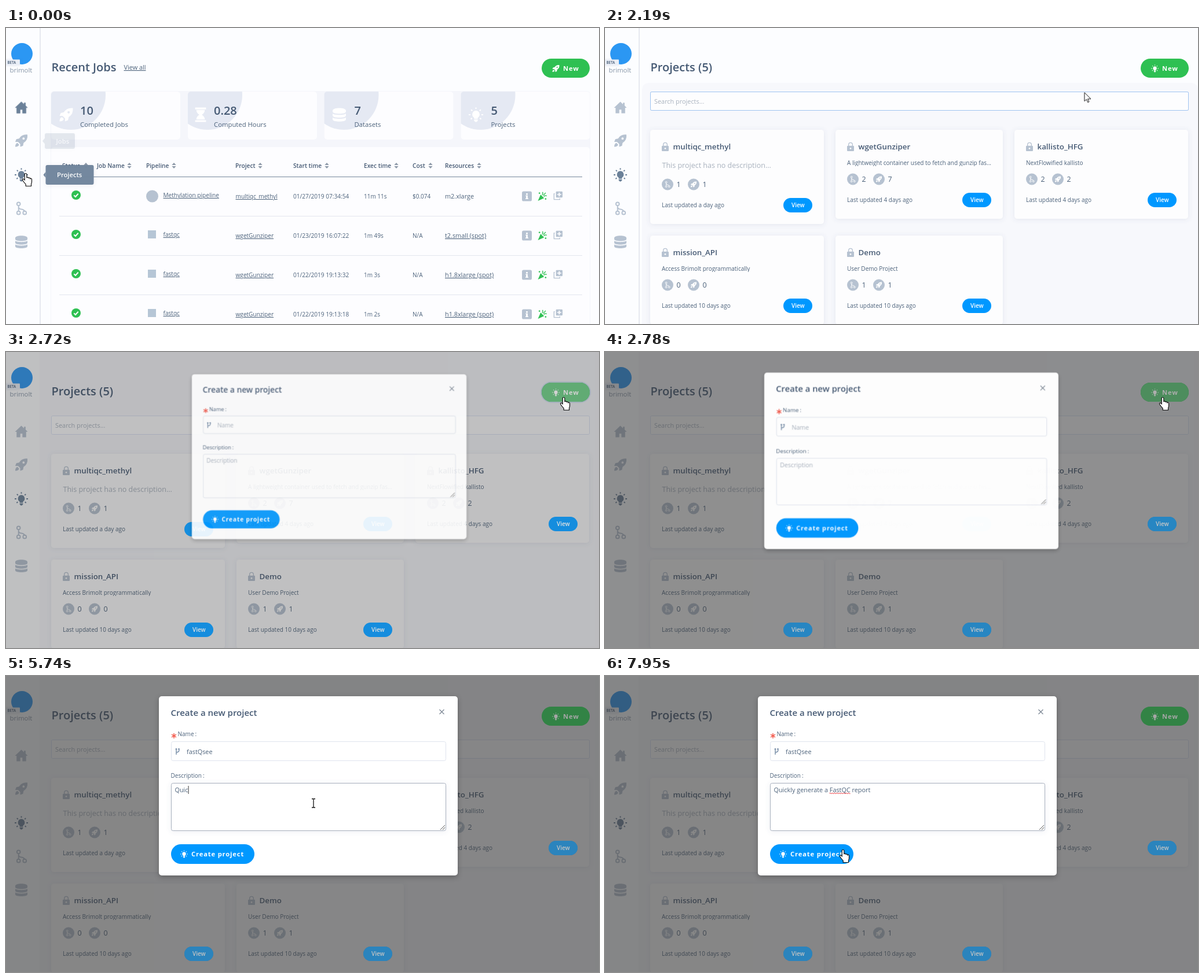
These frames come from a looping animation (1024x512 px, 8 s). An HTML page:

```html
<!DOCTYPE html>
<html lang="en">
<head>
<meta charset="utf-8">
<title>Create a project</title>
<style>
html, body { margin: 0; width: 100%; height: 100%; overflow: hidden; background: #fcfdff; }
svg { display: block; }
#stage { width: 100vw; height: 100vh; font: 10px "Open Sans", sans-serif; }
text { fill: #4c627b; white-space: pre; }
symbol { fill: currentColor; overflow: visible; }
.line { fill: none; stroke: currentColor; stroke-width: 2; }
.semi { font-weight: 600; fill: #465a74; }
.pale { fill: #a9b2be; }
.brand { fill: #8796a8; }
.light { fill: #fff; font-weight: 600; }
.bold { fill: #fff; font-weight: 700; font-size: 11.2px; letter-spacing: .85px; }
.link { text-decoration: underline; }
.field { fill: #fff; stroke: #dfe4ee; }

.anim { animation: 8s linear infinite; }
.step { animation-timing-function: step-end; }

#jobsTip { animation-name: jobsTip; }
@keyframes jobsTip { 0%, .7% { opacity: .18 } 2.1%, 100% { opacity: 0 } }
#projectsTip { animation-name: projectsTip; }
@keyframes projectsTip { 0%, 22.375% { opacity: .98 } 23.875%, 100% { opacity: 0 } }
#jobsPage { animation-name: jobsPage; }
@keyframes jobsPage { 0%, 11.5% { opacity: 1 } 14.5% { opacity: .04 } 15.1%, 100% { opacity: 0 } }
#shade { animation-name: shade; }
@keyframes shade { 0% { opacity: 0 } 31%, 100% { opacity: 1 } }
#searchHover { animation-name: searchHover; }
@keyframes searchHover { 0% { opacity: 0 } 23.5% { opacity: 1 } 27.5%, 100% { opacity: 0 } }
#newHover { animation-name: newHover; }
@keyframes newHover { 0%, 28% { opacity: 0 } 29%, 40.25% { opacity: 1 } 41.75%, 100% { opacity: 0 } }
#newRing { animation-name: newRing; }
@keyframes newRing { 0%, 31% { opacity: 0 } 32%, 33.5% { opacity: 1 } 34.5%, 100% { opacity: 0 } }
#mask { animation-name: mask; }
@keyframes mask { 0%, 33.1% { opacity: 0 } 33.25% { opacity: .08 } 34.75% { opacity: .92 } 35.2%, 100% { opacity: 1 } }
#modal { animation-name: modal; transform-origin: 966px 78px; }
@keyframes modal {
  0% { opacity: 0; transform: scale(.2) }
  33.125% { opacity: 0; transform: scale(.2); animation-timing-function: cubic-bezier(.08, .82, .17, 1) }
  35.75%, 100% { opacity: 1; transform: scale(1) }
}
#nameFocus { animation-name: nameFocus; }
@keyframes nameFocus { 0%, 45.5% { opacity: 0 } 47%, 62.4% { opacity: 1 } 63.25%, 100% { opacity: 0 } }
#descFocus { animation-name: descFocus; }
@keyframes descFocus { 0%, 56.5% { opacity: 0 } 57.4%, 62.4% { opacity: .6 } 63.25%, 100% { opacity: 1 } }
#squiggle { animation-name: squiggle; }
@keyframes squiggle { 0% { opacity: 0 } 89.6%, 100% { opacity: 1 } }

#cursor { animation-name: cursor; }
@keyframes cursor {
  0%, .75% { transform: translate(34px, 252px) }
  2.1%, 22.375% { transform: translate(34px, 253px) }
  23.875%, 26.625% { transform: translate(764px, 127px) }
  29%, 40.25% { transform: translate(963px, 79px) }
  41.75%, 44.5% { transform: translate(560px, 174px) }
  45.5%, 54.875% { transform: translate(568px, 141px) }
  57.375%, 65.7% { transform: translate(529px, 219px) }
  65.75%, 94.5% { transform: translate(531px, 220px) }
  98.75%, 100% { transform: translate(411px, 301px) }
}
#hand { animation-name: hand; }
@keyframes hand { 0% { opacity: 1 } 22.5% { opacity: 0 } 28.5% { opacity: 1 } 40.4% { opacity: 0 } 98.25%, 100% { opacity: 1 } }
#arrow { animation-name: arrow; }
@keyframes arrow {
  0% { opacity: 0 } 22.5% { opacity: 1 } 23.75% { opacity: 0 } 26.9% { opacity: 1 } 28.5% { opacity: 0 }
  40.4% { opacity: 1 } 45.25% { opacity: 0 } 97% { opacity: 1 } 98.25%, 100% { opacity: 0 }
}
#beam { animation-name: beam; }
@keyframes beam { 0% { opacity: 0 } 23.75% { opacity: 1 } 26.9% { opacity: 0 } 45.25% { opacity: 1 } 97%, 100% { opacity: 0 } }
</style>
</head>
<body>
<svg id="stage" viewBox="0 0 1024 512">
  <defs>
    <filter id="soft" x="-20%" y="-20%" width="140%" height="140%"><feDropShadow dx="0" dy="1" stdDeviation="4" flood-color="#5a6b8c" flood-opacity=".12"/></filter>
    <filter id="drop" x="-20%" y="-20%" width="140%" height="140%"><feDropShadow dx="0" dy="3" stdDeviation="4" flood-opacity=".25"/></filter>
    <symbol id="home" viewBox="0 0 24 24"><path d="M12 1L0 12.5h3V23h7v-7h4v7h7V12.5h3L20 8.500V3h-3v3z"/></symbol>
    <symbol id="rocket" viewBox="0 0 24 24"><path fill-rule="evenodd" d="M23 1Q13 0 8 8L3 9 1 14h5l4 4v5l5-2 1-5Q24 11 23 1zM16 6a2 2 0 1 1 0 4 2 2 0 0 1 0-4zM5 16q-4 1-4 7 6 0 7-4z"/></symbol>
    <symbol id="bulb" viewBox="0 0 24 24"><path d="M12 5a6.5 6.5 0 0 0-3 12v2h6v-2a6.5 6.5 0 0 0-3-12zM9 20h6v2l-2 2h-2l-2-2z"/><path class="line" d="M12 0v2.5M4 3.5l2 2M20 3.5l-2 2M0 12h3M21 12h3M3.5 19.5l2-2M20.5 19.5l-2-2"/></symbol>
    <symbol id="branch" viewBox="0 0 24 24"><path class="line" d="M7 7v10M7 9q0 4 5 4.500t6 4"/><g class="line"><circle cx="7" cy="4" r="3"/><circle cx="7" cy="20" r="3"/><circle cx="18" cy="20" r="3"/></g></symbol>
    <symbol id="base" viewBox="0 0 24 24"><path d="M1 5c0-5.5 22-5.5 22 0v2c0 4.5-22 4.5-22 0zM1 10c3 3 19 3 22 0v3.5c0 4.5-22 4.5-22 0zM1 16.5c3 3 19 3 22 0V20c0 4.5-22 4.5-22 0z"/></symbol>
    <symbol id="glass" viewBox="0 0 24 24"><path d="M3 0h18v3H3zM3 21h18v3H3zM5 4h14q0 5-5 8 5 3 5 8H5q0-5 5-8-5-3-5-8z"/></symbol>
    <symbol id="lock" viewBox="0 0 24 24"><rect x="3" y="10" width="18" height="14" rx="2"/><path class="line" d="M7 11V7a5 5 0 0 1 10 0v4"/><circle cx="12" cy="17" r="2" fill="#fff"/></symbol>
    <symbol id="check" viewBox="0 0 24 24"><circle cx="12" cy="12" r="12"/><path d="M6.5 12.5l4 4 7-8" fill="none" stroke="#fff" stroke-width="3"/></symbol>
    <symbol id="info" viewBox="0 0 24 24"><rect width="24" height="24" rx="4"/><path fill="#fff" d="M10 5h4v3.5h-4zM9 10h5v7h1.5v2h-7v-2H10v-5H9z"/></symbol>
    <symbol id="party" viewBox="0 0 24 24"><path d="M0 24L7 8l9 9z"/><path class="line" d="M11 9q3-3 1-8M15 13q3-4 8-2M14 10l6-7M4 2v4M2 4h4M20 17v4M18 19h4"/></symbol>
    <symbol id="copy" viewBox="0 0 24 24"><path class="line" d="M4 7H2v15h15v-3"/><path fill-rule="evenodd" d="M9 1h13q2 0 2 2v12q0 2-2 2H9q-2 0-2-2V3q0-2 2-2zM14 4v4h-4v2h4v4h3v-4h4V8h-4V4z"/></symbol>
    <symbol id="sort" viewBox="0 0 24 24"><path d="M4 10l8-9 8 9zM4 14h16l-8 9z"/></symbol>
    <clipPath id="cardClip"><rect width="223" height="83" rx="5"/></clipPath>
  </defs>

  <rect width="1024" height="512" fill="#fcfdff"/>
  <path d="M64 512V108q0-13 13-13h934q13 0 13 13v404z" fill="#f7f8fc"/>
  <g id="homeIdle"></g>
  <g id="projectsPage"></g>
  <g id="jobsPage" class="anim"></g>
  <g id="sidebar"></g>
  <g id="mask" class="anim"></g>
  <g id="modal" class="anim"></g>
  <g id="tips"></g>

  <g id="cursor" class="anim">
    <path id="hand" class="anim step" transform="translate(-6 -2)" fill="#fff" stroke="#111" stroke-width="1.2" d="M6 1.5q1.8 0 1.8 1.8v6q.2-1.3 1.8-1.1 1.2.2 1.4 1.6.3-.9 1.6-.7 1.2.2 1.3 1.6.5-.7 1.5-.4 1.1.4 1.1 1.8v4q0 2-1 3.6v3.8H6.2v-3.1Q3 17 .6 13.2q-.5-1.5.6-2 1.2-.4 3 1.6V3.3Q4.2 1.5 6 1.5z"/>
    <path id="arrow" class="anim step" fill="#fff" stroke="#111" d="M0 0v15l3.500-3.200 2.300 5.200 2.200-1-2.300-5H11z"/>
    <path id="beam" class="anim step" fill="none" stroke="#111" stroke-width="1.3" d="M-3-7.500h2.300L0-7l.7-.5H3M0-7V7M-3 7.500h2.300L0 7l.7.5H3"/>
  </g>
</svg>

<script>
const $ = id => document.getElementById(id);
const text = (x, y, label, cls = '', size = 10) =>
  `<text x="${x}" y="${y}" class="${cls}" ${cls === 'bold' ? '' : `font-size="${size}"`}>${label}</text>`;
const icon = (id, cx, cy, size, color = '#b6c2d1') =>
  `<use href="#${id}" x="${cx - size / 2}" y="${cy - size / 2}" width="${size}" height="${size}" color="${color}"/>`;
const box = (x, y, w, h, r, attrs) =>
  `<rect x="${x}" y="${y}" width="${w}" height="${h}" rx="${r}" ${attrs}/>`;

const GREEN = '#2ec052', BLUE = '#0098ff', DARK = '#6b8199';

const newButton = (name, fill = GREEN) =>
  box(925, 53, 83, 33, 16.5, `fill="${fill}"`) + icon(name, 949.5, 70, 13, '#fff') + text(962, 74, 'New', 'bold');
const viewButton = (right, cy, fill) =>
  box(right - 70, cy - 12.5, 50, 25, 12.5, `fill="${fill}"`) + text(right - 56, cy + 3.5, 'View', 'light');

// Projects page
const projects = [
  { x: 78, y: 176, w: 300, name: 'multiqc_methyl', flows: 1, runs: 1, age: 'a day' },
  { x: 398, y: 176, w: 289, name: 'wgetGunziper', about: 'A lightweight container used to fetch and gunzip fas...', flows: 2, runs: 7, age: '4 days' },
  { x: 707, y: 176, w: 300, name: 'kallisto_HFG', about: 'NextFlowified kallisto', flows: 2, runs: 2, age: '4 days' },
  { x: 78, y: 359, w: 300, name: 'mission_API', about: 'Access Brimolt programmatically', flows: 0, runs: 0, age: '10 days' },
  { x: 398, y: 359, w: 289, name: 'Demo', about: 'User Demo Project', flows: 1, runs: 1, age: '10 days' },
];
const drop = p => p.about ? 0 : 9;
const badge = (name, x, y, count) =>
  `<circle cx="${x}" cy="${y}" r="10" fill="#b6c2d1"/>` + icon(name, x, y, 11, '#fff') + text(x + 15.5, y + 4.5, count, '', 12.5);
const projectCard = p => {
  const { x, y } = p, d = drop(p);
  return box(x, y, p.w, 154 + d, 5, 'fill="#fdfdfe" filter="url(#soft)"')
    + icon('lock', x + 26, y + 29, 16)
    + text(x + 39.5, y + 34, p.name, 'semi', 13.35)
    + (p.about
      ? text(x + 20, y + 61, p.about) + box(x + 15, y + 63, p.w - 30, 5, 0, 'fill="#fdfdfe"')
      : text(x + 20.5, y + 66, 'This project has no description...', 'pale', 12.5))
    + badge('branch', x + 30, y + 85.5 + d, p.flows)
    + badge('rocket', x + 75, y + 85.5 + d, p.runs)
    + text(x + 20, y + 125 + d, `Last updated ${p.age} ago`);
};
const viewButtons = fill => projects.map(p => viewButton(p.x + p.w, p.y + 121.5 + drop(p), fill)).join('');

$('homeIdle').innerHTML =
  '<path d="M59 0v512" stroke="#e6e9f0" stroke-width="2"/>'
  + box(58, 0, 966, 512, 0, 'id="shade" class="anim step" fill="#f7f8fc"')
  + icon('home', 26.5, 137.5, 22);

$('projectsPage').innerHTML =
  text(78.5, 75, 'Projects (5)', 'semi', 20)
  + box(923, 51, 87, 37, 18.5, 'id="newRing" class="anim" fill="#b5d6f2"')
  + newButton('bulb')
  + `<g id="newHover" class="anim">${newButton('bulb', '#7bd092')}</g>`
  + box(78.5, 110.5, 929, 32, 2, 'fill="#fdfdfe" stroke="#d9e1f3"')
  + box(78.5, 110.5, 929, 32, 2, 'id="searchHover" class="anim step" fill="none" stroke="#9fc3f0"')
  + text(85, 131, 'Search projects...', 'pale', 10.9)
  + projects.map(projectCard).join('') + viewButtons(BLUE);

// Recent jobs page
const stats = [
  [78, 50, 'rocket', '10', 'Completed Jobs'],
  [314, 45, 'glass', '0.28', 'Computed Hours'],
  [549.5, 52, 'base', '7', 'Datasets'],
  [785.5, 52, 'bulb', '5', 'Projects'],
];
const statCard = ([x, dx, name, value, label]) =>
  `<g transform="translate(${x} 110)"><g clip-path="url(#cardClip)">`
  + box(0, 0, 223, 83, 5, 'fill="#fdfdff"')
  + '<circle cx="34" cy="6" r="60" fill="#e5e9f3"/></g>'
  + icon(name, name === 'glass' ? 22 : 26, 40, 25, '#fff')
  + text(dx, 40, value, 'semi', 20) + text(dx, 61, label, '', 11.3) + '</g>';
const columns = [[97, 'Status', 138], [157, 'Job Name', 213], [242, 'Pipeline', 290], [396, 'Project', 439],
  [496, 'Start time', 554], [618, 'Exec time', 674], [702, 'Cost', 733], [758, 'Resources', 817]];
const jobs = [
  ['Methylation pipeline', 'multiqc_methyl', '01/27/2019 07:34:54', '11m 11s', '$0.074', 'm2.xlarge'],
  ['fastqc', 'wgetGunziper', '01/23/2019 16:07:22', '1m 49s', 'N/A', 't2.small (spot)'],
  ['fastqc', 'wgetGunziper', '01/22/2019 19:13:32', '1m 3s', 'N/A', 'h1.8xlarge (spot)'],
  ['fastqc', 'wgetGunziper', '01/22/2019 19:13:18', '1m 2s', 'N/A', 'h1.8xlarge (spot)'],
];
const jobRow = ([pipeline, project, start, time, cost, machine], i) => {
  const y = 291 + 68 * i;
  return icon('check', 121, y - 2, 16, GREEN)
    + (i ? box(245, y - 9, 14, 14, 0, 'fill="#b6c6d6"') : `<circle cx="252.5" cy="${y}" r="10.5" fill="#b6c2d1"/>`)
    + text(271.5, y + 2, pipeline, 'link', 10.1) + text(396.5, y + 4, project, 'link', 10.1)
    + text(496, y + 4, start, '', 10.1) + text(618, y + 4, time) + text(702, y + 4, cost)
    + text(758, y + 4, machine, i ? 'link' : '', 10.85)
    + icon('info', 899.5, y, 17) + icon('party', 926.5, y, 16, GREEN) + icon('copy', 953, y - 1, 16)
    + `<path d="M92 ${y + 34.5}h903" stroke="#e3e6ee"/>`;
};

$('jobsPage').innerHTML =
  box(60, 0, 964, 512, 0, 'fill="#fcfdff"')
  + text(78.5, 75, 'Recent Jobs', 'semi', 20) + text(203.5, 72, 'View all', 'link', 10.9)
  + newButton('rocket')
  + box(77, 109, 932, 420, 6, 'fill="#f5f6fb"')
  + stats.map(statCard).join('')
  + box(78, 206, 930, 320, 5, 'fill="#fdfdff"')
  + columns.map(([x, label, sx]) => text(x, 242, label, 'semi', 10.2) + icon('sort', sx, 238, 11, '#8d99a8')).join('')
  + '<path d="M92 257.5h903" stroke="#75879b"/>'
  + jobs.map(jobRow).join('')
  + icon('home', 26.5, 137.5, 22, DARK);

// Sidebar
const menu = [['rocket', 195], ['bulb', 254], ['branch', 312], ['base', 370]];
$('sidebar').innerHTML =
  '<circle cx="27.5" cy="44.5" r="18.5" fill="#2b97f3"/>'
  + box(-2, 54.5, 26, 10, 1, 'fill="#e9eef6" filter="url(#soft)"')
  + text(2.5, 62, 'BETA', 'semi', 6.2)
  + text(6.5, 77, 'brimolt', 'brand', 11.4)
  + menu.map(([name, y]) => icon(name, 26.5, y, 23, name === 'bulb' ? DARK : undefined)).join('');

$('mask').innerHTML =
  box(0, 0, 1024, 512, 0, 'fill="#373737" fill-opacity=".6"')
  + `<g opacity=".5">${viewButtons('#35aaf2')}</g><g opacity=".25">${newButton('bulb')}</g>`;

// Dialog
const focusRing = (id, y, h, color) =>
  box(285.5, y, 474, h, 3, `id="${id}" class="anim" fill="#fff" stroke="${color}" filter="url(#soft)"`);
const wave = 'q1 -2 2 0t2 0'.repeat(9);
$('modal').innerHTML =
  box(264, 35, 516, 310, 5, 'fill="#fff" filter="url(#drop)"')
  + text(284.5, 69, 'Create a new project', 'semi', 15)
  + '<path d="M748.5 58l8 8m0-8l-8 8" stroke="#7c8794" stroke-width="1.2"/>'
  + '<path d="M290 99v9M286 101.2l8 4.600M294 101.2l-8 4.600" stroke="#f25a4c" stroke-width="1.5"/>'
  + text(296.5, 104, 'Name&thinsp;:') + text(284.5, 176, 'Description&thinsp;:')
  + box(285.5, 113.5, 474, 33, 3, 'class="field"') + focusRing('nameFocus', 113.5, 33, '#a3b8d3')
  + '<path d="M294 126v10M294 132q5 0 5-4.500" fill="none" stroke="#7d92ab" stroke-width="1.5"/><circle cx="294" cy="126.5" r="1.4" fill="#7d92ab"/><circle cx="298.5" cy="126.5" r="1.4" fill="#7d92ab"/>'
  + box(285.5, 185.5, 474, 82, 3, 'class="field"') + focusRing('descFocus', 185.5, 82, '#aab2bf')
  + '<path d="M750 266l8-8M754 266l4-4" stroke="#555"/>'
  + text(312, 135, '<tspan id="nameText"></tspan>', '', 10.85)
  + text(291.5, 201, '<tspan id="descText"></tspan>', '', 10.85)
  + `<g id="nameHint">${text(312, 135, 'Name', 'pale', 10.85)}</g>`
  + `<g id="descHint">${text(291.5, 201, 'Description', 'pale', 10.85)}</g>`
  + `<path id="squiggle" class="anim step" d="M387.5 203${wave}" fill="none" stroke="#e8252a"/>`
  + '<path id="caret" stroke="#333"/>'
  + box(285, 291, 144, 34, 17, `fill="${BLUE}"`) + icon('bulb', 307.5, 308, 13, '#fff')
  + text(320, 312, 'Create project', 'bold');

// Tooltips
const tip = (id, x, cy, w, h, label) =>
  `<g id="${id}" class="anim">` + box(x, cy - h / 2, w, h, 3, 'fill="#71869d" filter="url(#soft)"')
  + `<path d="M${x} ${cy - 5}l-4 5 4 5z" fill="#71869d"/>` + text(x + 19.5, cy + 4, label, 'light', 11.2) + '</g>';
$('tips').innerHTML = tip('jobsTip', 67, 195.5, 52, 27, 'Jobs') + tip('projectsTip', 68.5, 254, 83, 34, 'Projects');

// Typing: keys are [time, characters typed], linear between
const fields = [
  { id: 'name', x: 312, y: 131, full: 'fastQsee', keys: [[3740, 1], [4290, 8]] },
  { id: 'desc', x: 291.5, y: 197, full: 'Quickly generate a FastQC report',
    keys: [[5560, 1], [6310, 16], [6380, 17], [7170, 26], [7220, 27], [7470, 32]] },
];
function typedCount(keys, t) {
  if (t < keys[0][0]) return 0;
  for (let i = 1; i < keys.length; i++) {
    const [t0, n0] = keys[i - 1], [t1, n1] = keys[i];
    if (t < t1) return Math.floor(n0 + (n1 - n0) * (t - t0) / (t1 - t0));
  }
  return keys.at(-1)[1];
}
function render(t) {
  let caret = '';
  for (const { id, x, y, full, keys } of fields) {
    const count = typedCount(keys, t), node = $(id + 'Text');
    node.textContent = full.slice(0, count);
    $(id + 'Hint').style.display = count ? 'none' : '';
    if (count && count < full.length) caret = `M${x + node.getComputedTextLength() + .5} ${y - 7}v14`;
  }
  $('caret').setAttribute('d', caret);
}
let start;
function frame(now) {
  start ??= now;
  render((now - start) % 8000);
  requestAnimationFrame(frame);
}
render(0);
requestAnimationFrame(frame);
</script>
</body>
</html>
```
